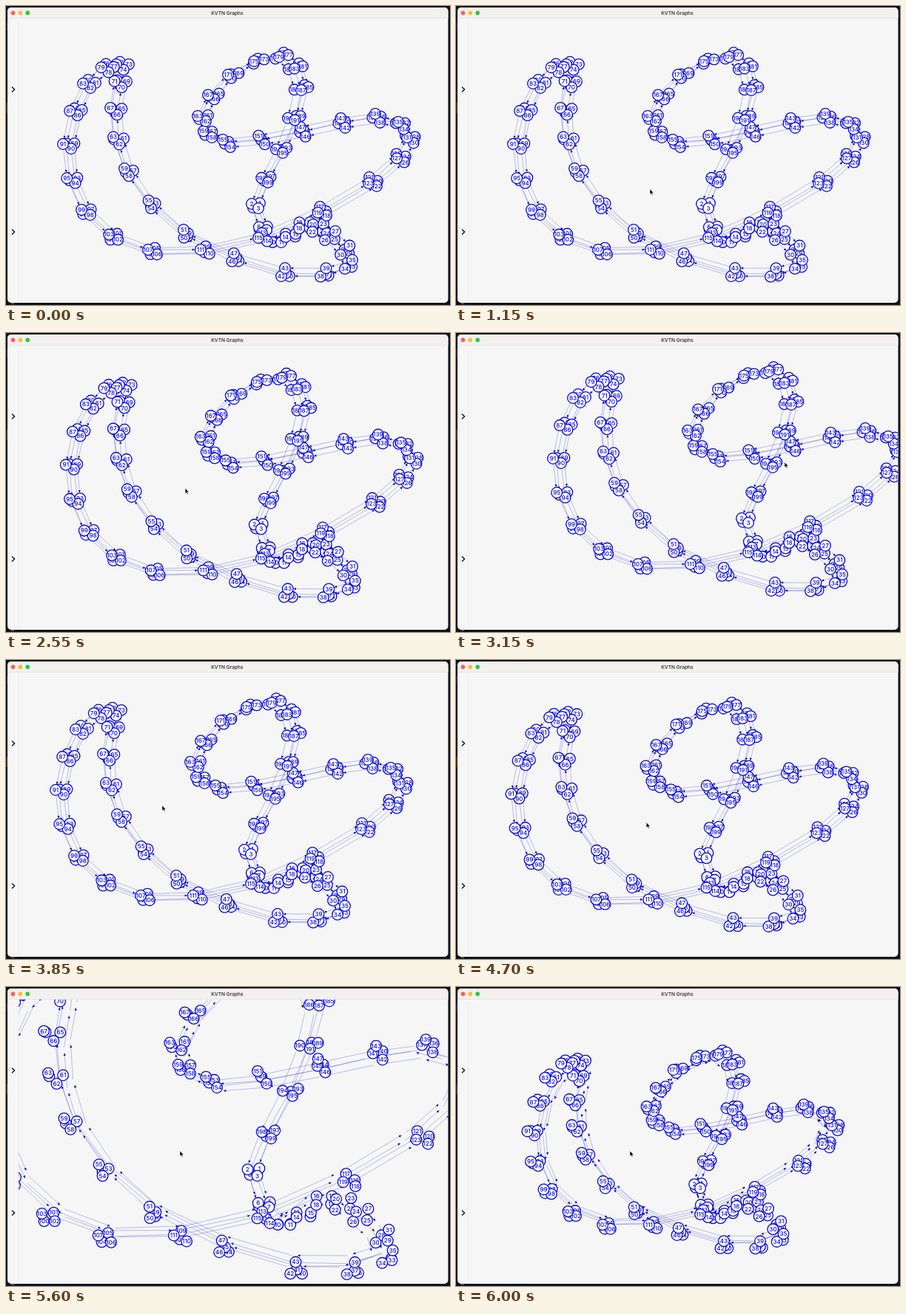
An HTML page that plays this animation: 600x405 px, repeating every 6.05 s.

```html
<!DOCTYPE html>
<html lang="en">
<head>
<meta charset="utf-8">
<title>KVTN Graphs</title>
<style>
  html, body { margin: 0; width: 100%; height: 100%; overflow: hidden; background: #0a1322; }
  svg { display: block; width: 100vw; height: 100vh; }
  text { font-family: Inter, "Liberation Sans", sans-serif; text-anchor: middle; }
  .node circle { fill: #fff; stroke: #0505dc; stroke-width: 1.3; }
  .node text { font-size: 8.1px; font-weight: 500; fill: #0505dc; }
</style>
</head>
<body>
<svg viewBox="0 0 600 405">
  <defs>
    <clipPath id="view"><path d="M17 17H597.5V397a5 5 0 0 1-5 5H17Z"/></clipPath>
    <clipPath id="frame"><rect x="2" y="2" width="595.5" height="400" rx="5"/></clipPath>
  </defs>
  <rect width="600" height="405" fill="#0a1322"/>
  <rect y="22" width="2" height="11" fill="#251d4a"/>
  <rect y="131" width="2" height="14" fill="#4a2c1c"/>
  <rect x="7" y="402" width="4" height="2" fill="#7a3b22"/>
  <g clip-path="url(#frame)">
    <rect x="2" y="2" width="596" height="401" fill="#f6f6f6"/>
    <rect x="2" y="2" width="596" height="14.5" fill="#f3f0f0"/>
    <rect x="2" y="16" width="596" height=".6" fill="#dedcdc"/>
    <rect x="16.6" y="17" width=".6" height="386" fill="#ececec"/>
  </g>
  <circle cx="9.5" cy="9.4" r="2.8" fill="#ff5f57"/>
  <circle cx="19.3" cy="9.4" r="2.8" fill="#febc2e"/>
  <circle cx="29.2" cy="9.4" r="2.8" fill="#28c840"/>
  <text x="299" y="11.6" font-size="6.6" font-weight="600" fill="#3a3838">KVTN Graphs</text>
  <path d="M8.4 110l3.2 3-3.2 3M8.4 303l3.2 3-3.2 3" fill="none" stroke="#111" stroke-width="1.4" stroke-linecap="round" stroke-linejoin="round"/>
  <g clip-path="url(#view)">
    <path id="lines" fill="none" stroke="#2020d8" stroke-width=".5" stroke-opacity=".58"/>
    <path id="heads" fill="#0a0ab4"/>
    <g id="nodes"></g>
  </g>
  <path id="cursor" d="M0 0V7.2L1.7 5.7 2.8 8.3 4 7.8 2.9 5.3H5.1Z" fill="#000" stroke="#fff" stroke-width=".5"/>
</svg>
<script>
const LOOP = 6050, STEP = 50, GROUPS = 50, SIZE = 4;
const $ = id => document.getElementById(id);

// Closed curve the groups follow: one point for every second group
const route = [
  [341,274], [372,320], [411,293], [445,305], [468,344], [377,355], [240,303], [160,220],
  [141,138], [149,79], [104,105], [77,187], [102,276], [192,330], [341,314], [490,240],
  [542,178], [499,146], [398,164], [293,181], [259,149], [300,93], [369,69], [399,114], [374,199]
];

// Offsets of a group's first three nodes from its last, for every fifth group
const shapes = [
  [-7,-1, 2,-7, -9,-6], [-14,1, -1,10, -15,11], [6,11, 1,7, -5,11], [1,3, 14,2, 8,10],
  [7,-5, 17,-1, 10,6], [2,7, 11,-1, 12,7], [12,-3, 1,-8, 11,4], [6,5, -3,7, 6,13],
  [2,4, 14,-1, 11,7], [6,-7, 11,-3, -8,1]
];

// Time, then values
const panKeys = [
  [1250, 0,0], [2000, -40,-1], [3150, 54,-17], [3850, -10,-11], [4350, 46,-10], [4800, -9,-5]
];
const cursorKeys = [
  [600, 470,110], [750, 239,244], [900, 239,244], [1150, 262,248], [1250, 262,248],
  [2000, 66,241], [3150, 444,175], [3850, 211,197], [4350, 425,205], [4800, 235,222]
];
const zoomKeys = [[4800, 0], [5050, .289], [5400, .61], [6000, -.122], [6100, -.24]];
const zoomAt = { x: 315, y: 299 }, edgeAt = { x: 305, y: 222 };

const linear = u => u;
const smooth = u => (1 - Math.cos(Math.PI * u)) / 2;

// Closed Catmull-Rom spline through rows of values
function ring(rows, pos) {
  const n = rows.length, i = Math.floor(pos), u = pos - i;
  const [a, b, c, d] = [-1, 0, 1, 2].map(k => rows[(i + k + n) % n]);
  return b.map((v, j) => v + u / 2 * (c[j] - a[j]
    + u * (2 * a[j] - 5 * v + 4 * c[j] - d[j] + u * (3 * (v - c[j]) + d[j] - a[j]))));
}

function sample(keys, t, ease) {
  if (t <= keys[0][0]) return keys[0].slice(1);
  const i = keys.findIndex(k => k[0] >= t);
  if (i < 0) return keys[keys.length - 1].slice(1);
  const a = keys[i - 1], b = keys[i];
  const u = ease((t - a[0]) / (b[0] - a[0]));
  return a.slice(1).map((v, j) => v + (b[j + 1] - v) * u);
}

const scaleFrom = (p, c, s) => ({ x: c.x + (p.x - c.x) * s, y: c.y + (p.y - c.y) * s });

const layout = [];
for (let g = 0; g < GROUPS; g++) {
  const [x, y] = ring(route, g / 2);
  const off = [...ring(shapes, g / 5), 0, 0];
  for (let j = 0; j < SIZE; j++)
    layout.push({ x: x + off[2 * j], y: y + off[2 * j + 1] });
}

$("nodes").innerHTML = layout.map((p, i) =>
  `<g class="node"><circle r="7.3"/><text y="2.9">${i}</text></g>`).join("");
const nodes = [...$("nodes").children];
const f = v => v.toFixed(2);

// Each node points to its counterpart in the next group
function drawEdges(pts) {
  let lines = "", heads = "";
  pts.forEach((a, i) => {
    const b = pts[(i + SIZE) % pts.length];
    const dx = b.x - a.x, dy = b.y - a.y, d = Math.hypot(dx, dy) || 1;
    const ux = dx / d, uy = dy / d;
    const tx = b.x - ux * 7.6, ty = b.y - uy * 7.6;
    const bx = tx - ux * 3.6, by = ty - uy * 3.6;
    lines += `M${f(a.x)} ${f(a.y)}L${f(tx)} ${f(ty)}`;
    heads += `M${f(tx)} ${f(ty)}L${f(bx - uy * 1.6)} ${f(by + ux * 1.6)}L${f(bx + uy * 1.6)} ${f(by - ux * 1.6)}Z`;
  });
  $("lines").setAttribute("d", lines);
  $("heads").setAttribute("d", heads);
}

function draw(t) {
  const [px, py] = sample(panKeys, t, smooth);
  const [zoom] = sample(zoomKeys, t, linear);
  // Edges run one step ahead of the nodes while zooming
  const [ahead] = sample(zoomKeys, t + STEP, linear);
  const pts = layout.map(p =>
    scaleFrom({ x: p.x + px, y: p.y + py }, zoomAt, Math.exp(zoom)));
  pts.forEach((p, i) => nodes[i].setAttribute("transform", `translate(${f(p.x)} ${f(p.y)})`));
  drawEdges(pts.map(p => scaleFrom(p, edgeAt, Math.exp(ahead - zoom))));

  const [cx, cy] = sample(cursorKeys, t, smooth);
  $("cursor").setAttribute("transform", `translate(${f(cx)} ${f(cy)})`);
  $("cursor").setAttribute("visibility", t < cursorKeys[0][0] ? "hidden" : "visible");
}

const start = performance.now();
let last = -1;
function tick(now) {
  const t = Math.floor(Math.max(0, now - start) % LOOP / STEP) * STEP;
  if (t !== last) draw(last = t);
  requestAnimationFrame(tick);
}
draw(0);
requestAnimationFrame(tick);
</script>
</body>
</html>
```
